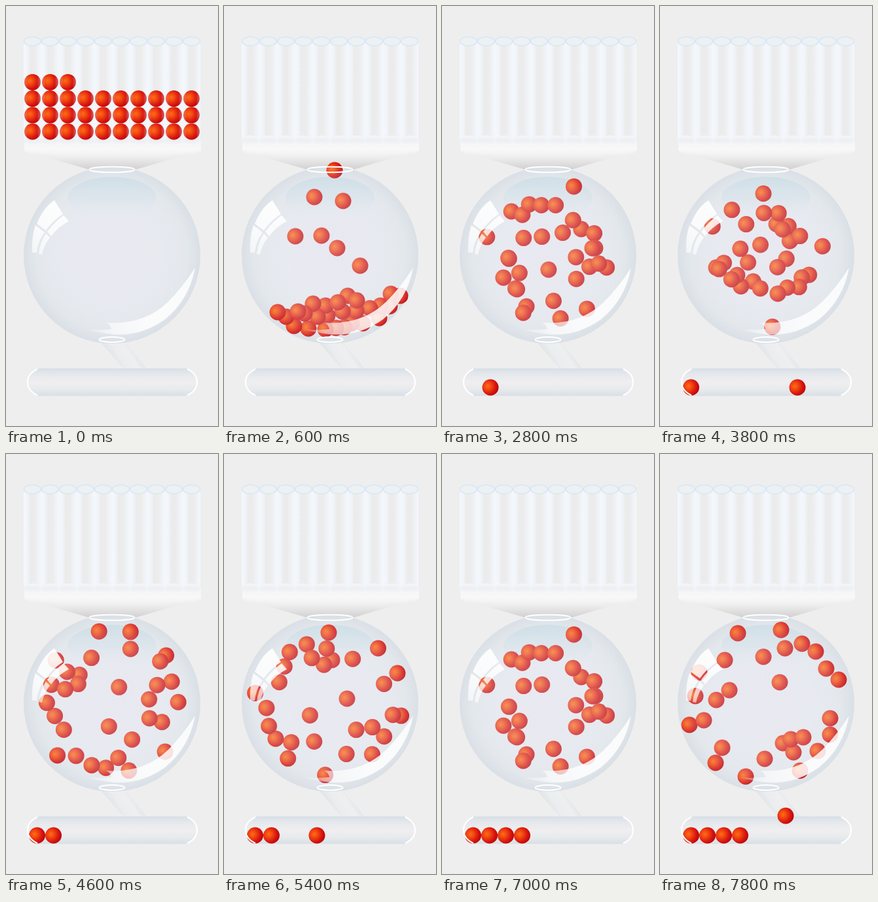
Write an HTML page with a canvas that moves like this. It is 324 by 642 pixels and loops after 8000 ms.

```html
<!DOCTYPE html>
<html lang="en">
<head>
<meta charset="utf-8">
<title>Ball machine</title>
<style>
html, body { margin: 0; width: 100%; height: 100%; overflow: hidden; background: #eee; }
canvas { display: block; }
</style>
</head>
<body>
<canvas id="stage" width="324" height="642"></canvas>
<script>
const ctx = document.getElementById('stage').getContext('2d');
const LOOP = 8000, STEP = 200, CYCLE = 1400, FIRST_DRAW = 2000;
const TOTAL = 33, RADIUS = 12.5, TAU = Math.PI * 2;
const GLOBE = { x: 162, y: 381, r: 135 };

const pairs = list => list.reduce((out, v, i) => (i % 2 ? out[out.length - 1].push(v) : out.push([v]), out), []);

// Resting heap; the last seven are the balls still in the air as the heap forms.
const heap = pairs([
  269,443, 255,440, 253,459, 237,477, 239,458, 223,462, 212,485, 195,485, 184,491,
  171,492, 155,494, 189,443, 202,466, 203,450, 181,467, 158,473, 155,458, 174,453,
  129,493, 143,475, 136,455, 107,489, 123,470, 95,475, 113,467, 82,468,
  208,397, 173,370, 149,351, 109,352, 182,298, 138,292, 169,251
]);
// One pose of the swirl; every other pose is turned and contracted from it.
const swirl = pairs([
  119,274, 185,269, 191,297, 217,290, 238,302, 254,328, 273,345, 158,310, 99,315,
  60,334, 54,370, 86,376, 106,361, 183,349, 260,404, 260,429, 241,454, 214,484,
  188,442, 204,456, 200,436, 219,433, 160,466, 131,493, 95,449, 85,472, 45,414,
  67,407, 254,376, 140,400, 120,335, 225,375, 150,430
]);

const random = i => { const v = Math.sin(i * 12.9898 + 4) * 43758.5453; return v - Math.floor(v); };
const enterTime = i => 80 + 16 * i;

function gradient(g, stops) {
  stops.forEach(([at, color]) => g.addColorStop(at, color));
  return g;
}
const linear = (x0, y0, x1, y1, ...stops) => gradient(ctx.createLinearGradient(x0, y0, x1, y1), stops);
const radial = (x, y, r, ...stops) => gradient(ctx.createRadialGradient(x, y, 0, x, y, r), stops);

function fillPath(d, style) {
  ctx.fillStyle = style;
  ctx.fill(new Path2D(d));
}
function strokePath(d, style, width) {
  ctx.strokeStyle = style;
  ctx.lineWidth = width;
  ctx.stroke(new Path2D(d));
}
function ellipse(x, y, rx, ry, fill, stroke, width) {
  ctx.beginPath();
  ctx.ellipse(x, y, rx, ry, 0, 0, TAU);
  if (fill) { ctx.fillStyle = fill; ctx.fill(); }
  if (stroke) { ctx.strokeStyle = stroke; ctx.lineWidth = width; ctx.stroke(); }
}

function ball(x, y) {
  ellipse(x, y, RADIUS, RADIUS,
    radial(x - 4, y - 2, 17, [0, '#ff6d14'], [0.3, '#f24a12'], [0.7, '#d81510'], [1, '#b80404']));
}

function columnBall(i, t) {
  const row = Math.floor(i / 10), column = i % 10;
  let gone = 0;
  for (let k = column; k < i; k += 10) if (enterTime(k) <= t) gone++;
  return [40.5 + 27 * column, 192 - 25.2 * (row - gone)];
}

function heapBall(i, t) {
  let [x, y] = heap[i];
  if (i < 26) {
    const u = Math.min(1, (t - enterTime(i)) / 110);
    x = 165 + (x - 165) * u;
    y = 251 + (y - 251) * u;
  } else if (t > 600) {
    x = 162 + (x - 162) * 1.5;
    y = 446 - 14 * (i % 2);
  }
  return turn(x, y, t > 800 ? 0.12 * Math.sin((t - 800) / 130) : 0, 1);
}

function turn(x, y, angle, scale) {
  const dx = (x - GLOBE.x) * scale, dy = (y - GLOBE.y) * scale;
  const c = Math.cos(angle), s = Math.sin(angle);
  return [GLOBE.x + dx * c - dy * s, GLOBE.y + dx * s + dy * c];
}

function swirlBall(i, t) {
  const q = (t - FIRST_DRAW - STEP) / STEP;
  const pull = Math.sin(q * 3 * Math.PI / 7) ** 2;
  return turn(...swirl[i], q * 2 * TAU / 7, 1 - 0.6 * pull * random(i));
}

function drawnBall(n, t) {
  const phase = Math.floor((t - FIRST_DRAW - n * CYCLE) / STEP);
  const chute = [[166, 523], [192, 553], [210, 583]];
  return chute[phase] || [Math.max(47.5 + 25 * n, 142 - 68 * (phase - 3)), 583];
}

function columnsBack() {
  for (let i = 0; i < 10; i++) {
    const x = 27 + 27 * i;
    ctx.fillStyle = linear(x, 0, x + 27, 0, [0, '#f4f7fc'], [0.2, '#f1f4f8'],
      [0.38, '#ebebec'], [0.62, '#ececed'], [0.85, '#f0f2f5'], [1, '#f3f7fc']);
    ctx.fillRect(x, 54, 27, 153);
  }
}

function funnel() {
  fillPath('M28 206H298V221Q292 228 252 234L198 250H127L72 234Q32 228 28 221Z',
    linear(0, 206, 0, 250, [0, '#f3f4f6'], [0.3, '#f6f6f6'], [0.6, '#ececec'], [1, '#d2d0d0']));
  fillPath('M28 206H298V220Q260 231 162 231Q66 231 28 220Z',
    linear(0, 206, 0, 232, [0, '#f3f4f6'], [0.5, '#f8f8f8'], [1, 'rgba(240,240,240,.5)']));
  for (let i = 0; i < 10; i++) {
    ellipse(40.5 + 27 * i, 205, 13.5, 7,
      linear(0, 198, 0, 212, [0, '#f5f7fa'], [0.5, '#eceef2'], [1, '#f4f5f7']));
  }
}

function columnsFront() {
  for (let i = 0; i < 10; i++) {
    const x = 27 + 27 * i;
    ctx.fillStyle = linear(x, 0, x + 27, 0, [0, 'rgba(243,247,252,.35)'], [0.25, 'rgba(243,247,252,0)'],
      [0.75, 'rgba(243,247,252,0)'], [1, 'rgba(243,247,252,.45)']);
    ctx.fillRect(x, 54, 27, 153);
    ellipse(x + 13.5, 54, 13, 6.8, '#eef0f2', '#d3e8f8', 1.4);
  }
}

function globeBack() {
  const { x, y, r } = GLOBE;
  ellipse(x, y, r, r, radial(x, y, r, [0, '#eae9f0'], [0.5, '#e8ebf0'], [0.85, '#e3e8ec'], [1, '#d9dfe5']));
  ellipse(162, 294, 68, 33, linear(0, 261, 0, 327, [0, '#cbdde6'], [0.5, '#d9e4ea'], [1, 'rgba(230,235,239,0)']));
}

function globeFront() {
  const { x, y, r } = GLOBE;
  ellipse(x, y, r, r, radial(x, y, r,
    [0, 'rgba(231,231,241,.32)'], [0.75, 'rgba(231,233,241,.28)'], [1, 'rgba(222,228,234,.1)']));

  const panes = linear(60, 300, 50, 380, [0, 'rgba(255,255,255,.92)'], [0.5, 'rgba(255,255,255,.82)'], [1, 'rgba(255,255,255,.6)']);
  fillPath('M74 297Q57 308 47 333L61 343Q71 328 87 318Z', panes);
  fillPath('M88 320L96 329Q80 337 69 352L63 345Q74 330 88 320Z', panes);
  fillPath('M45 335Q39 352 40 377L47 377Q48 361 59 346Z', panes);
  fillPath('M61 348L67 354Q58 365 55 380L50 379Q52 361 61 348Z', panes);

  fillPath('M289 400Q280 449 243 479Q202 508 155 501Q138 499 120 494Q142 496 161 494Q160 487 153 484Q211 488 248 452Q270 430 289 400Z',
    linear(120, 0, 289, 0, [0, 'rgba(255,255,255,.1)'], [0.25, 'rgba(255,255,255,.6)'], [0.6, 'rgba(255,255,255,.85)'], [1, 'rgba(255,255,255,.85)']));
}

function chute() {
  fillPath('M144 513L180 511L216 556H181Z',
    linear(162, 542, 198, 519, [0, '#dfe4e8'], [0.3, '#ebedef'], [0.65, '#efeff0'], [1, '#dce2e7']));
}

function tray() {
  fillPath('M50 554H275Q292 559 292 575Q292 591 275 596H50Q33 591 33 575Q33 559 50 554Z',
    linear(0, 554, 0, 596, [0, '#d7dfe6'], [0.2, '#e4e8ec'], [0.5, '#f0eef0'], [0.75, '#e8eaed'], [1, '#d8e0e6']));
}

function trayEnds() {
  strokePath('M48 555Q33 562 33 575Q33 588 48 595', '#fff', 2.2);
  strokePath('M277 555Q292 562 292 575Q292 588 277 595', '#fff', 2.2);
}

function draw(time) {
  const t = Math.floor((time % LOOP) / STEP) * STEP;
  ctx.fillStyle = '#eee';
  ctx.fillRect(0, 0, 324, 642);

  columnsBack();
  funnel();
  chute();
  tray();
  globeBack();

  const mixing = t >= FIRST_DRAW - 3 * STEP;
  const draws = Math.max(0, Math.floor((t - FIRST_DRAW) / CYCLE) + 1);
  for (let i = 0; i < TOTAL - draws; i++) {
    const place = mixing ? swirlBall : t >= enterTime(i) ? heapBall : columnBall;
    ball(...place(i, t));
  }

  columnsFront();
  globeFront();
  for (let n = 0; n < draws; n++) ball(...drawnBall(n, t));
  trayEnds();
  ellipse(162, 250, 34.5, 4.3, null, '#fff', 2);
  ellipse(162, 510, 19.5, 4, null, '#fff', 2);
}

const start = performance.now();
function tick() {
  draw(performance.now() - start);
  requestAnimationFrame(tick);
}
tick();
</script>
</body>
</html>
```
